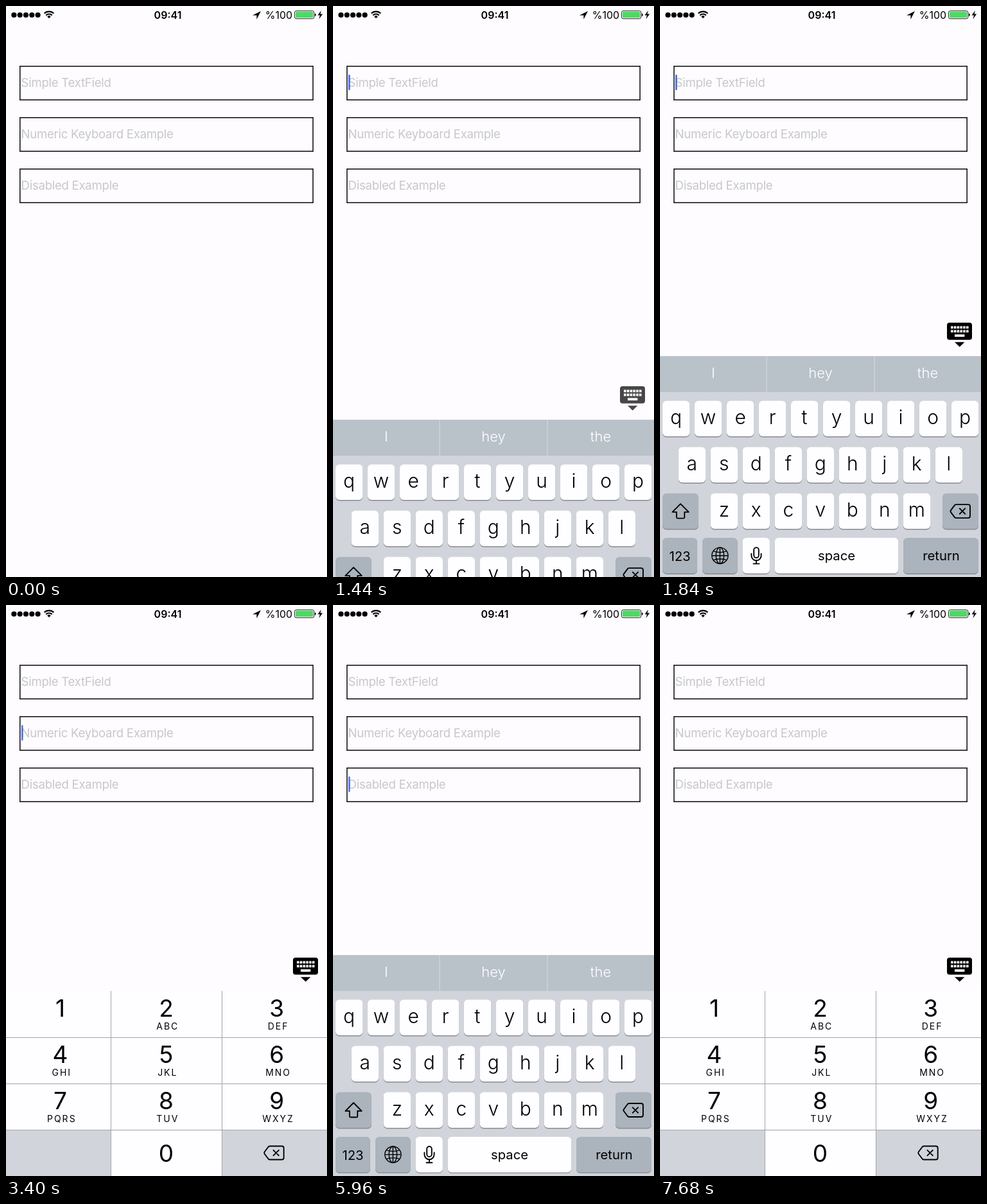
These frames come from a looping animation (500x889 px, 8000 ms). An HTML page:

```html
<!DOCTYPE html>
<html lang="en">
<head>
<meta charset="utf-8">
<title>Text fields</title>
<style>
html, body { margin: 0; width: 100%; height: 100%; overflow: hidden; background: #fefcff; }
svg { display: block; width: 500px; height: 889px; font-family: Inter, Roboto, sans-serif; }
.mid { text-anchor: middle; }
.hint { font-size: 18.6px; letter-spacing: -.28px; fill: #c7c7cc; }
.status { font-size: 16px; }
.word { font-size: 22px; font-weight: 350; fill: #fff; }
.letter { font-size: 30px; font-weight: 350; }
.label { font-size: 20.3px; }
.digit { font-size: 37px; }
.sub { font-size: 14px; letter-spacing: 2px; }
.line { fill: none; stroke: #000; stroke-width: 1.9; stroke-linejoin: round; stroke-linecap: round; }
</style>
</head>
<body>
<svg id="stage" viewBox="0 0 500 889"></svg>
<script>
const LOOP = 8000, TICK = 40, PANEL = 344, BAR = 56;
const WHITE = '#fefdff', GREY = '#d1d5db', DARK = '#abb3bd';

const rect = (x, y, w, h, fill, r = 0) =>
  `<rect x="${x}" y="${y}" width="${w}" height="${h}" rx="${r}" fill="${fill}"/>`;
const text = (x, y, cls, s) => `<text x="${x}" y="${y}" class="${cls}">${s}</text>`;
const line = (d, extra = '') => `<path class="line" d="${d}" ${extra}/>`;
const key = (x, y, w, fill = WHITE) =>
  rect(x, y + 1.4, w, 55.4, '#898c91', 6) + rect(x, y, w, 55.4, fill, 6);

function statusBar() {
  let s = '';
  for (let i = 0; i < 5; i++) s += `<circle cx="${12.4 + i * 9.3}" cy="14" r="4.1"/>`;
  s += `<path d="M67 19.2L64.3 16.4A3.9 3.9 0 0 1 69.7 16.4Z"/>`;
  s += line('M62.3 14.4A6.7 6.7 0 0 1 71.7 14.4M59.7 11.6A10.4 10.4 0 0 1 74.3 11.6',
    'style="stroke-width:2.1;stroke-linecap:butt"');
  s += text(252, 19.7, 'status mid" font-weight="600', '09:41');
  s += `<path d="M397 8L384 14.6H390.4V20.8Z"/>`;
  s += text(425, 19.7, 'status mid', '%100');
  s += `<rect x="449.5" y="7.6" width="30.4" height="12.2" rx="2.6" fill="none" stroke="#222" stroke-width="1"/>`;
  s += rect(451, 9.1, 27.4, 9.2, '#4cd964', 1.2);
  s += `<path d="M481 11.5Q482.8 12 482.8 13.7T481 16Z"/>`;
  return s + `<path d="M490.8 7L485.6 14.4H489L487.4 20.4L493.2 12.6H489.6Z"/>`;
}

function fields() {
  return ['Simple TextField', 'Numeric Keyboard Example', 'Disabled Example'].map((s, i) =>
    `<rect x="21.8" y="${93.8 + i * 80}" width="456.4" height="52.4" fill="none" stroke="#17171a" stroke-width="1.6"/>` +
    text(23.6, 126 + i * 80, 'hint', s)).join('');
}

function wordBar() {
  let s = rect(0, 545, 500, 58, '#b9c1c9');
  s += rect(165.5, 545, 1.2, 58, '#d3d8dd') + rect(333.5, 545, 1.2, 58, '#d3d8dd');
  ['I', 'hey', 'the'].forEach((w, i) => s += text(83 + i * 167, 579, 'word mid', w));
  return s;
}

const eraser = line('M461.5 776H480Q483 776 483 779V794Q483 797 480 797H461.5Q460 797 459 796L453 788Q452 786.5 453 785L459 777Q460 776 461.5 776Z' +
  'M466.8 782.3L475.2 790.7M475.2 782.3L466.8 790.7');

function letterPad() {
  let s = rect(0, 601, 500, 288, GREY);
  [['qwertyuiop', 4, 614.6], ['asdfghjkl', 28.7, 686.6], ['zxcvbnm', 78.7, 758.6]].forEach(([row, x, y]) =>
    [...row].forEach((c, i) => {
      s += key(x + i * 50, y, 42.3) + text(x + i * 50 + 21.1, y + 36, 'letter mid', c);
    }));
  s += key(4, 758.6, 56, DARK) + key(440, 758.6, 56, DARK) + eraser;
  s += line('M32 775L44.7 787.8H38.2V796Q38.2 797.5 36.7 797.5H27.3Q25.8 797.5 25.8 796V787.8H19.3Z');
  s += key(4, 828, 54, DARK) + key(66, 828, 54.6, DARK) + key(128.6, 828, 42.3);
  s += key(178.8, 828, 192.4) + key(379, 828, 117, DARK);
  s += text(31, 863.7, 'label mid', '123') + text(275, 862.5, 'label mid', 'space') + text(438, 862.5, 'label mid', 'return');
  s += `<g fill="none" stroke="#000" stroke-width="1.4"><circle cx="93.4" cy="855.6" r="12.6"/>` +
    `<ellipse cx="93.4" cy="855.6" rx="6.2" ry="12.6"/>` +
    `<path d="M93.4 843V868.2M80.8 855.6H106M83 848.6Q93.4 852.6 103.8 848.6M83 862.6Q93.4 858.6 103.8 862.6"/></g>`;
  s += `<rect x="146.2" y="843" width="7.6" height="16" rx="3.8" class="line"/>`;
  return s + line('M142.4 852.5V855.6A7.6 7.6 0 0 0 157.6 855.6V852.5M150 863.5V868M145.5 868.3H154.5');
}

function numberPad() {
  let s = rect(0, 601, 500, 288, WHITE) + rect(0, 817, 163, 72, GREY) + rect(337, 817, 163, 72, GREY);
  for (const y of [673, 745, 817]) s += rect(0, y, 500, 1, '#a3a4a8');
  for (const x of [163, 336]) s += rect(x, 601, 1, 288, '#a3a4a8');
  const x = [84.5, 249.5, 421.8];
  ['', 'ABC', 'DEF', 'GHI', 'JKL', 'MNO', 'PQRS', 'TUV', 'WXYZ'].forEach((sub, i) => {
    const y = 641 + Math.floor(i / 3) * 72;
    s += text(x[i % 3], y, 'digit mid', i + 1) + text(x[i % 3] + 2.3, y + 20, 'sub mid', sub);
  });
  return s + text(249.5, 866.5, 'digit mid', 0) + `<g transform="translate(-50.3 66.5)">${eraser}</g>`;
}

function hideButton() {
  let s = rect(447, 493, 39, 26.6, '#000', 4);
  for (let i = 0; i < 6; i++) s += rect(453 + i * 4.8, 498.4, 3.6, 3.8, WHITE);
  for (let i = 0; i < 6; i++) s += rect(453 + i * 4.8, 504.4, 3.6, 3.8, WHITE);
  return s + rect(459, 511.2, 15.4, 3.8, WHITE) + `<path d="M459 523.2H474.4L466.7 530.6Z"/>`;
}

const stage = document.getElementById('stage');
stage.innerHTML = rect(0, 0, 500, 889, '#fefcff') + statusBar() + fields() +
  `<g id="caret">${rect(24, 107, 2.6, 24, '#4169e1', 1)}</g>` +
  `<g id="letters"><g id="bar">${wordBar()}</g>${letterPad()}</g>` +
  `<g id="numbers">${numberPad()}</g><g id="hide">${hideButton()}</g>`;
const [caret, letters, bar, numbers, hide] =
  ['caret', 'letters', 'bar', 'numbers', 'hide'].map(id => document.getElementById(id));

// focus changes: time, field row, number pad, hide button
const FOCUS = [[1360, 0, 0, 1], [2920, 1, 1, 1], [4200, 0, 0, 1], [5520, 2, 0, 0], [7000, 1, 1, 1]];
// caret fades: time, length, opacity at the end
const FADES = [[1850, 200, 0], [2340, 240, 1], [2860, 200, 0], [3380, 220, 0], [3860, 240, 1],
  [4700, 220, 0], [5220, 240, 1], [5940, 220, 0], [6420, 240, 1], [6940, 220, 0], [7460, 220, 0]];

const last = (list, t) => list.filter(e => e[0] <= t).pop();
// share of the way left in a critically damped spring
const left = ms => {
  const x = Math.max(0, ms) * .0208;
  return (1 + x) * Math.exp(-x);
};
const move = (el, y) => el.setAttribute('transform', `translate(0 ${y.toFixed(2)})`);
const show = (el, a) => el.setAttribute('opacity', a);

function caretAlpha(t, since) {
  const fade = last(FADES, t);
  if (!fade || fade[0] < since) return 1;
  const p = Math.min(1, (t - fade[0]) / fade[1]);
  return fade[2] ? p : 1 - p;
}

function draw(time) {
  const t = Math.floor(time % LOOP / TICK) * TICK;
  const focus = last(FOCUS, t);
  if (!focus) return [caret, letters, numbers, hide].forEach(el => show(el, 0));
  const [since, row, numeric, button] = focus;
  const rise = left(t - 1320);
  const barY = since === 4200 ? BAR * left(t - 4147) : 0;
  move(caret, row * 80);
  show(caret, caretAlpha(t, since));
  move(letters, PANEL * rise);
  show(letters, 1 - numeric);
  move(bar, barY);
  show(numbers, numeric);
  move(hide, numeric ? BAR : PANEL * rise + barY);
  show(hide, button * (1 - rise));
}

let start;
function tick(now) {
  start ??= now;
  draw(now - start);
  requestAnimationFrame(tick);
}
draw(0);
requestAnimationFrame(tick);
</script>
</body>
</html>
```
